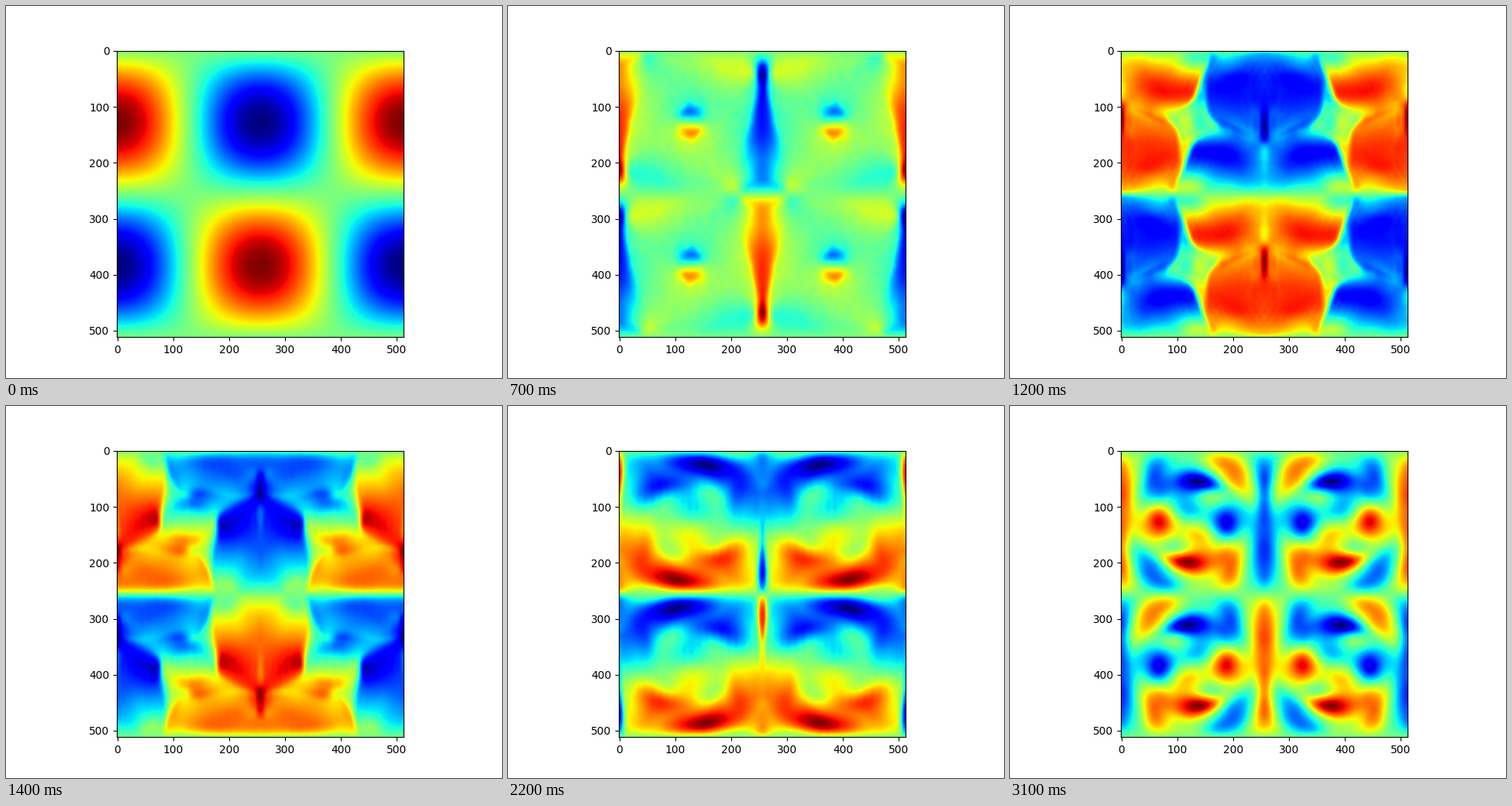
A matplotlib script for the animation above (3.2 s loop, 640 by 480 pixels).

```python
"""Taylor-Green vortex in 3D: x velocity in the plane z = 0."""
import math

import numpy as np
import matplotlib.pyplot as plt
from matplotlib.animation import FuncAnimation

FRAMES, INTERVAL = 32, 100
FRAME_TIME = 1.6            # flow time per frame
VISCOSITY = 0.001
PIXELS = 512
POINTS, MODES = 30, 20      # per axis of one octant, 2/3 dealiased
COURANT = 2.3
REAL = np.float32

# The flow keeps its symmetries: wave numbers are all even or all odd,
# and v(x, y, z) = u(y, x, pi - z), so only u and w are stored.
wave = np.array([2 * np.arange(MODES) + parity for parity in (0, 1)])
nodes = (np.arange(POINTS) + 0.5) * np.pi / (2 * POINTS)


def basis(func, x):
    return np.array([func(np.outer(x, k)) for k in wave]).astype(REAL)


SIN, COS = basis(np.sin, nodes), basis(np.cos, nodes)
weight = np.full((2, 1, MODES), 2 / POINTS, REAL)
weight[0, 0, 0] = 1 / POINTS

# One entry per axis, stacked over the x and z components.
VELOCITY = [np.stack(b) for b in ((SIN, COS), (COS, COS), (COS, SIN))]
VORTICITY = [np.stack(b) for b in ((COS, SIN), (SIN, SIN), (SIN, COS))]
ANALYSIS = [np.ascontiguousarray((b * weight).swapaxes(-1, -2))
            for b in VELOCITY]

KX = wave[:, :, None, None].astype(REAL)
KY = wave[:, None, :, None].astype(REAL)
KZ = wave[:, None, None, :].astype(REAL)
K2 = KX**2 + KY**2 + KZ**2
INV_K2 = 1 / np.where(K2 == 0, 1, K2).astype(REAL)
DAMPING = (VISCOSITY * K2).astype(REAL)
SIGN = np.array([1, -1], REAL)[:, None, None, None]


def transform(a, bases):
    bx, by, bz = bases
    rows, cols = bx.shape[-2:]
    a = bx @ a.reshape(2, 2, cols, cols * cols)
    a = by[:, :, None] @ a.reshape(2, 2, rows, cols, cols)
    a = a.reshape(2, 2, rows * rows, cols) @ bz.swapaxes(-1, -2)
    return a.reshape(2, 2, rows, rows, rows)


def mix(a):
    """Sum and difference of the even and odd parts."""
    return np.stack([a[:, 0] + a[:, 1], a[:, 0] - a[:, 1]], axis=1)


def partner(u):
    """Modes of the y component that belong to an x component."""
    return SIGN * u.transpose(0, 2, 1, 3)


def turn(f):
    """Swap x and y on the grid and mirror z."""
    return np.ascontiguousarray(f[::-1].transpose(0, 2, 1, 3))


def slope(vel):
    u, w = vel
    v = partner(u)
    curl = np.stack([KZ * v - KY * w, KY * u - KX * v])
    a, c = mix(transform(vel, VELOCITY))
    p, r = mix(transform(curl, VORTICITY))
    q = turn(p)
    s = a * q
    cross = np.stack([turn(a) * r + c * q, -s - turn(s)])
    force = transform(mix(cross) * REAL(0.5), ANALYSIS)
    fx, fz = force
    pressure = (KX * fx + KY * partner(fx) + KZ * fz) * INV_K2
    fx -= KX * pressure
    fz -= KZ * pressure
    return force - DAMPING * vel


def advance(vel, dt):
    a = slope(vel)
    b = slope(vel + dt / 2 * a)
    c = slope(vel + dt / 2 * b)
    d = slope(vel + dt * c)
    return vel + dt / 6 * (a + 2 * b + 2 * c + d)


def step_count(vel):
    u, w = np.abs(mix(transform(vel, VELOCITY)))
    speed = float((u + turn(u) + w).max())
    return math.ceil(FRAME_TIME * speed * wave.max() / COURANT)


grid = np.arange(PIXELS) * 2 * np.pi / PIXELS
GRID_SIN, GRID_COS = basis(np.sin, grid), basis(np.cos, grid)


def plane(vel):
    flat = vel[0].sum(axis=-1)
    return sum(GRID_SIN[p] @ flat[p] @ GRID_COS[p].T for p in (0, 1))


def simulate():
    vel = np.zeros((2, 2, MODES, MODES, MODES), REAL)
    vel[0, 1, 0, 0, 0] = 1
    planes = [plane(vel)]
    for _ in range(FRAMES - 1):
        steps = step_count(vel)
        for _ in range(steps):
            vel = advance(vel, FRAME_TIME / steps)
        planes.append(plane(vel))
    return planes


planes = simulate()
fig, ax = plt.subplots(figsize=(6.4, 4.8), dpi=100)
image = ax.imshow(planes[0], cmap="jet")


def draw(i):
    image.set_data(planes[i])
    image.autoscale()
    return [image]


anim = FuncAnimation(fig, draw, frames=FRAMES, interval=INTERVAL,
                     repeat=True, repeat_delay=0)
plt.show()
```
